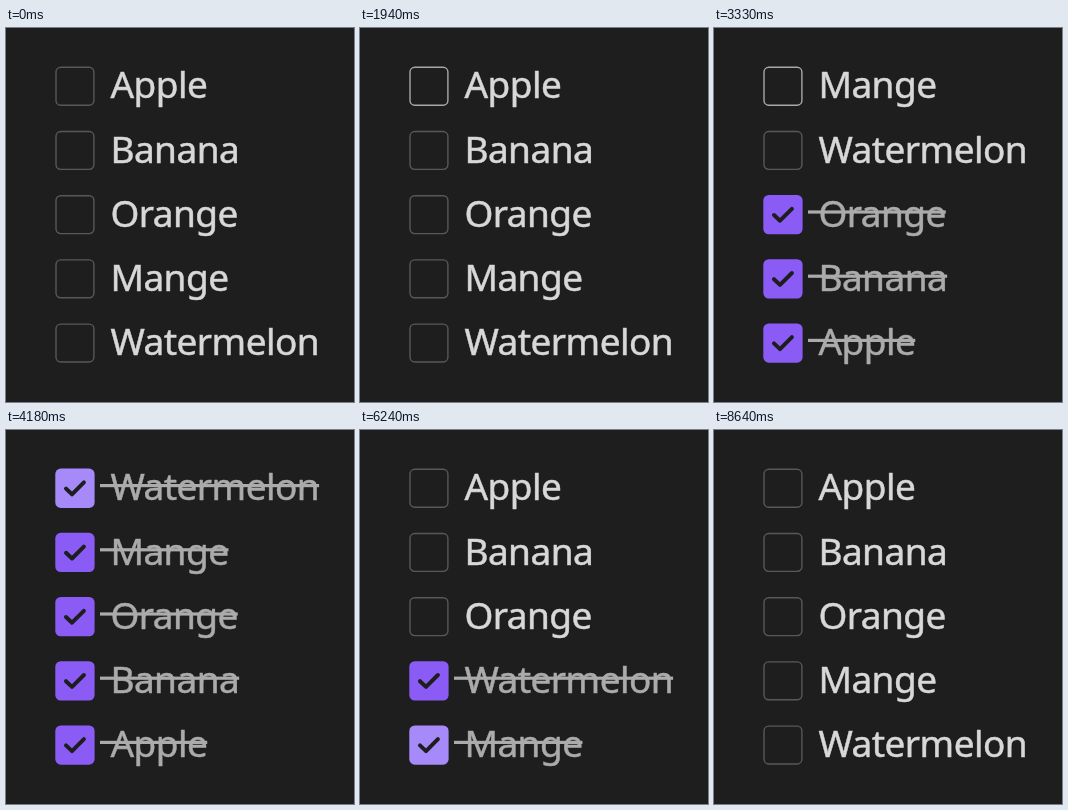
Recreate the animation shown at these times as an HTML page with a canvas. Size 348 px wide and 374 px high, loop 8.67 s.

```html
<!DOCTYPE html>
<html lang="en">
<head>
<meta charset="utf-8">
<title>Sorting checklist</title>
<style>
  html, body { margin: 0; width: 100%; height: 100%; overflow: hidden; background: #1e1e1e; }
  canvas { display: block; }
</style>
</head>
<body>
<canvas id="stage" width="348" height="374"></canvas>
<script>
const ctx = document.getElementById('stage').getContext('2d');
const LOOP = 8670;
const ITEMS = ['Apple', 'Banana', 'Orange', 'Mange', 'Watermelon'];
const CHECKS = [2220, 2680, 3140, 3600, 4060];
const UNCHECKS = [5300, 5710, 6240, 6700, 7180];
const BOX = { x: 49.3, y: 38.6, size: 39.3, radius: 5.5 };
const ROW = 64.2;
const TEXT_X = 104.4;

const countPast = (times, t) => times.filter(time => time <= t).length;

// Open items keep their order; done items follow, most recent first.
function listAt(t) {
  const done = countPast(CHECKS, t);
  const reopened = countPast(UNCHECKS, t);
  const open = done < ITEMS.length ? ITEMS.slice(done) : ITEMS.slice(0, reopened);
  const closed = ITEMS.slice(reopened, done).reverse();
  return [
    ...open.map(label => ({ label, checked: false })),
    ...closed.map(label => ({ label, checked: true }))
  ];
}

// The unseen pointer rests on the first row, then sweeps down to the last.
function hoveredRow(t) {
  if (t < 1900 || t >= 7490) return -1;
  const p = Math.min(1, Math.max(0, (t - 4450) / 500));
  const y = 4 * p * p * (3 - 2 * p);
  const row = Math.round(y);
  return Math.abs(y - row) * ROW <= BOX.size / 2 ? row : -1;
}

function boxPath(y, inset) {
  const size = BOX.size - inset * 2;
  ctx.beginPath();
  ctx.roundRect(BOX.x + inset, y + inset, size, size, BOX.radius - inset);
}

function drawCheckbox(y, checked, hovered) {
  if (!checked) {
    boxPath(y, 0.7);
    ctx.lineWidth = 1.4;
    ctx.strokeStyle = hovered ? '#a8a8a8' : '#585858';
    ctx.stroke();
    return;
  }
  boxPath(y, 0);
  ctx.fillStyle = hovered ? '#a68af9' : '#8a5cf5';
  ctx.fill();
  ctx.beginPath();
  ctx.moveTo(60, y + 20);
  ctx.lineTo(66, y + 25.7);
  ctx.lineTo(77.9, y + 13.8);
  ctx.lineWidth = 4;
  ctx.lineCap = ctx.lineJoin = 'round';
  ctx.strokeStyle = '#1e1e1e';
  ctx.stroke();
}

function drawLabel(y, label, checked) {
  ctx.fillStyle = ctx.strokeStyle = checked ? '#ababab' : '#d8d8d8';
  ctx.lineWidth = 0.5;
  ctx.fillText(label, TEXT_X, y + 31.8);
  ctx.strokeText(label, TEXT_X, y + 31.8);
  if (checked) {
    const end = TEXT_X + ctx.measureText(label).width;
    ctx.fillRect(94, y + 15.4, end - 94, 3.2);
  }
}

function draw(t) {
  ctx.fillStyle = '#1e1e1e';
  ctx.fillRect(0, 0, 348, 374);
  ctx.font = '37px "Noto Sans", sans-serif';
  ctx.letterSpacing = '-0.55px';
  const hover = hoveredRow(t);
  listAt(t).forEach(({ label, checked }, row) => {
    const y = BOX.y + row * ROW;
    drawCheckbox(y, checked, row === hover);
    drawLabel(y, label, checked);
  });
}

const start = performance.now();
function tick() {
  draw((performance.now() - start) % LOOP);
  requestAnimationFrame(tick);
}
tick();
</script>
</body>
</html>
```
